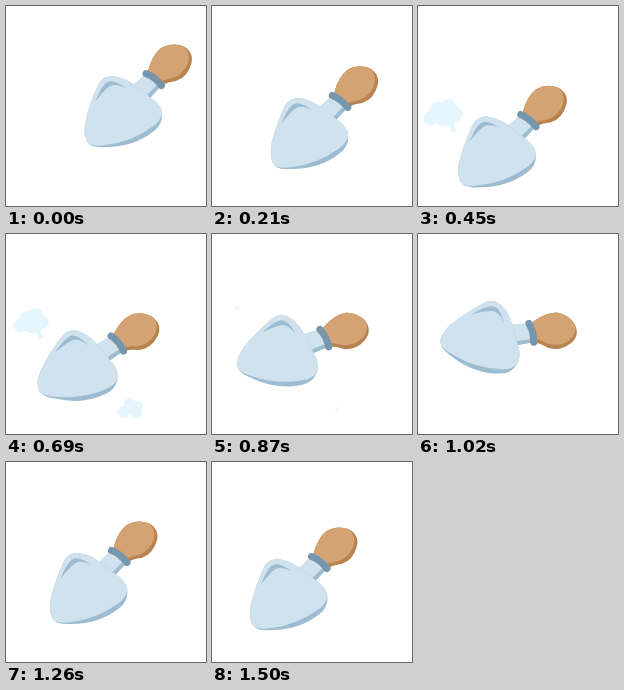
Write an HTML page that moves like this. It is 200 px wide and 200 px high and loops after 1.83 s.

```html
<!DOCTYPE html>
<html lang="en">
<head>
<meta charset="utf-8">
<title>Trowel</title>
<style>
  html, body { margin: 0; width: 100%; height: 100%; overflow: hidden; background: #fff; }
  svg { display: block; width: 100%; height: 100%; }
</style>
</head>
<body>
<svg viewBox="0 0 200 200">
  <g id="puffLeft" fill="#e6f6fd">
    <circle cx="13" cy="112" r="7.5"/>
    <circle cx="20" cy="104" r="8"/>
    <circle cx="30" cy="102" r="9"/>
    <circle cx="37" cy="108" r="7.5"/>
    <circle cx="25" cy="112" r="8"/>
    <path d="M24 118Q33 119 34 126Q37 128 39 124Q34 121 38 114L28 108Z"/>
  </g>
  <g id="puffRight" fill="#e6f6fd">
    <circle cx="124" cy="170" r="6"/>
    <circle cx="118" cy="178" r="6"/>
    <circle cx="130" cy="178" r="6"/>
    <circle cx="132" cy="172" r="5"/>
    <circle cx="125" cy="176" r="5"/>
  </g>
  <g id="trowel">
    <path fill="#d0e2ee" d="M126 80L138 69L154 81L144 92Z"/>
    <path fill="#9dbcd1" d="M154 81L144 92L141 89L151 79Z"/>
    <path fill="#9dbcd1" d="M83 138Q77 133 79 117Q84 96 93 77Q98 70 106 70Q117 71 127 78L144 91Q156 99 156 109Q156 119 148 125Q128 141 100 141Q88 142 83 138Z"/>
    <path fill="#d0e2ee" d="M83 138Q77 133 79 117Q84 96 93 77Q98 70 106 70Q117 71 127 78L144 91Q156 99 156 107Q155 115 146 121Q125 136 100 139Q89 141 83 138Z"/>
    <path fill="#9dbcd1" d="M89 96Q95 81 100 77Q106 72 120 82Q109 77 104 80Q99 83 89 96Z"/>
    <path fill="#b98350" d="M142 65Q146 49 155 42Q165 36 177 40Q188 46 185.500 57Q182 71 170 75Q161 76 157 79Z"/>
    <path fill="#d4a373" d="M142 65Q146 49 155 42Q166 36 177 40Q185 46 182 57Q178 68 167 72Q157 74 153 76Z"/>
    <path fill="none" stroke="#7596ac" stroke-width="7" stroke-linecap="round" d="M140 67.500Q149 71 155.500 79.500"/>
  </g>
</svg>
<script>
  const LOOP = 1830, STEP = 30;
  const [trowel, puffLeft, puffRight] =
    ['trowel', 'puffLeft', 'puffRight'].map(id => document.getElementById(id));

  const smooth = u => u * u * (3 - 2 * u);
  const linear = u => u;
  const scoop = u => u ** 1.4;
  const progress = (t, a, b) => Math.min(1, Math.max(0, (t - a) / (b - a)));

  // time, collar x, collar y, rotation, easing towards the next pose
  const poses = [
    [0, 147, 73, 0, smooth],
    [405, 109.5, 114.5, 0, scoop],
    [1020, 113, 98, 38, linear],
    [1080, 117, 83, 46, smooth],
    [1265, 112.5, 94, 0, smooth],
    [1500, 106.5, 100, 0, linear]
  ];

  function poseAt(t) {
    const i = poses.findLastIndex(p => p[0] <= t);
    const a = poses[i], b = poses[i + 1] || a;
    const u = a === b ? 0 : a[4](progress(t, a[0], b[0]));
    return [1, 2, 3].map(k => a[k] + (b[k] - a[k]) * u);
  }

  function placePuff(puff, cx, cy, rise, scale) {
    puff.setAttribute('transform',
      `translate(${cx} ${cy - rise}) scale(${scale}) translate(${-cx} ${-cy})`);
  }

  function draw(now) {
    const t = Math.floor((now % LOOP) / STEP) * STEP;
    const [x, y, angle] = poseAt(t);
    trowel.setAttribute('transform',
      `translate(${x - 147} ${y - 73}) rotate(${angle} 147 73)`);

    const fade = 1 - smooth(progress(t, 690, 930));
    const settle = 1 - 0.08 * progress(t, 450, 690);
    placePuff(puffLeft, 25, 109, (t - 450) / 12, smooth(progress(t, 330, 450)) * settle * fade);
    placePuff(puffRight, 125, 175, 0, smooth(progress(t, 450, 540)) * fade);

    requestAnimationFrame(draw);
  }
  requestAnimationFrame(draw);
</script>
</body>
</html>
```
